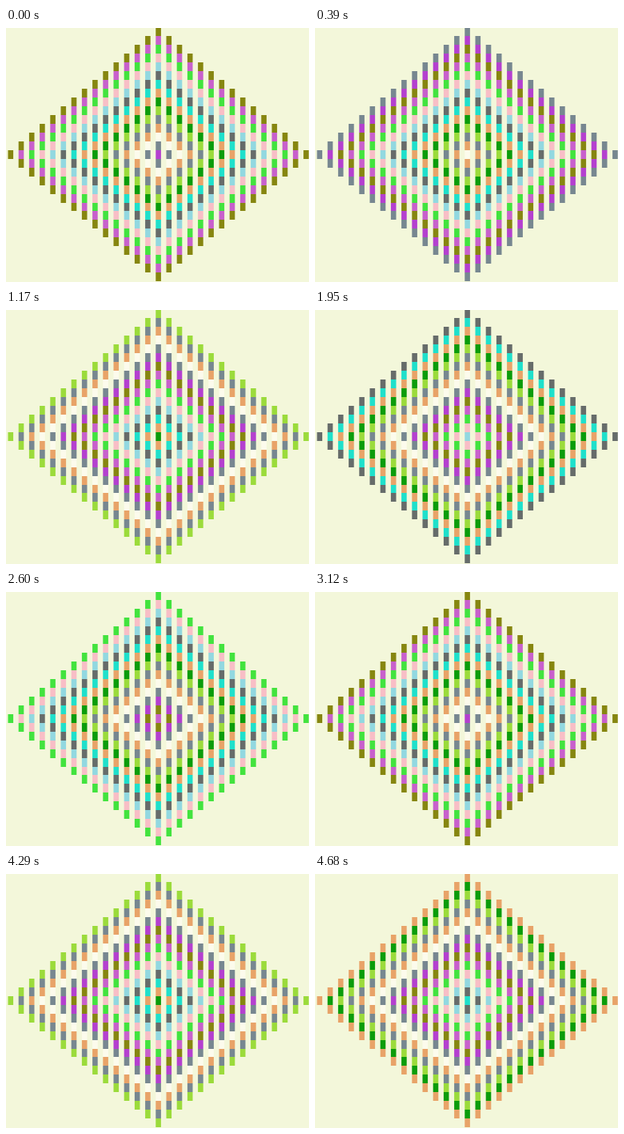
An HTML page with a canvas for the animation above (4810 ms loop, 379 by 318 pixels).

```html
<!DOCTYPE html>
<html lang="en">
<head>
<meta charset="utf-8">
<title>Diamond rings</title>
<style>
html, body { margin: 0; width: 100%; height: 100%; overflow: hidden; background: #f3f7da; }
canvas { display: block; }
</style>
</head>
<body>
<canvas id="stage" width="379" height="318"></canvas>
<script>
const ctx = document.getElementById('stage').getContext('2d');
const LOOP = 4810, TICK = 130;
const RADIUS = 14;
const CX = 190.6, CY = 158.3;
const PITCH_X = 13.2, PITCH_Y = 10.95, CELL_W = 6.6;

// Ring colours, listed from the rim inwards
const COLORS = [
  '#0b9c0b', '#9bdb3b', '#778790', '#e8a368', '#fcfbec',
  '#778790', '#b440cf', '#868610', '#c860cc', '#42e33e',
  '#f8bec6', '#92d8e0', '#666c6a', '#1fe0cb', '#e8a368'
];
const START = 7;

function draw(shift) {
  const n = COLORS.length;
  ctx.fillStyle = '#f3f7da';
  ctx.fillRect(0, 0, 379, 318);
  for (let col = -RADIUS; col <= RADIUS; col++) {
    const reach = RADIUS - Math.abs(col);
    const x = CX + col * PITCH_X - CELL_W / 2;
    for (let row = -reach; row <= reach; row++) {
      const depth = reach - Math.abs(row);
      const top = Math.round(CY + (row - 0.5) * PITCH_Y);
      const bottom = Math.round(CY + (row + 0.5) * PITCH_Y);
      ctx.fillStyle = COLORS[(START + depth - shift + 2 * n) % n];
      ctx.fillRect(x, top, CELL_W, bottom - top);
    }
  }
}

let shown = -1;
function frame() {
  const tick = Math.floor((performance.now() % LOOP) / TICK);
  // Five ring steps outwards in every eight ticks
  const shift = Math.floor(5 * (tick + 1) / 8);
  if (shift !== shown) draw(shown = shift);
  requestAnimationFrame(frame);
}
frame();
</script>
</body>
</html>
```
